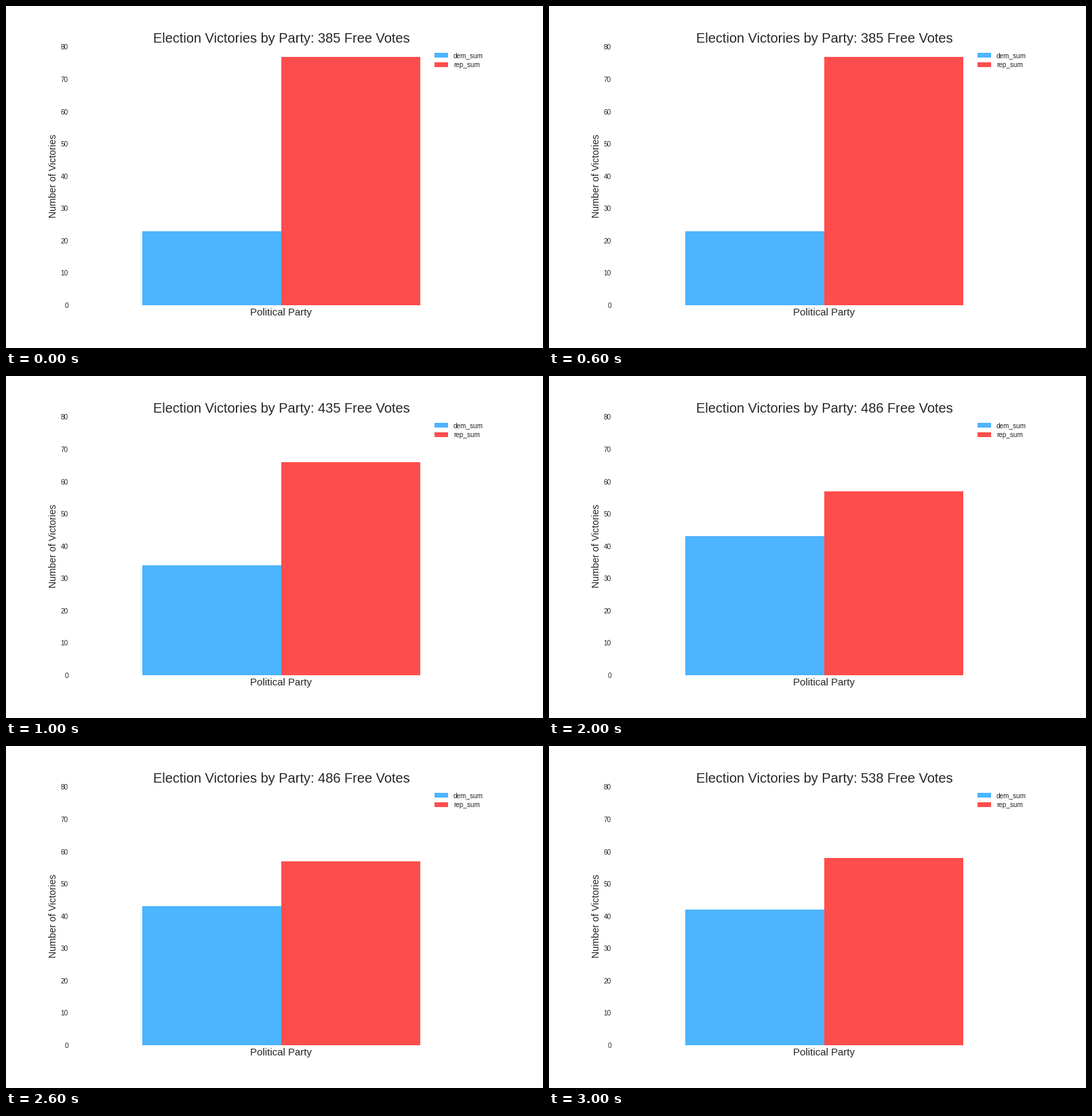
Write a matplotlib script that moves like this. It is 792x504 px and loops after 4000 ms.

```python
import matplotlib.pyplot as plt
from matplotlib.animation import FuncAnimation
from matplotlib.patches import Rectangle

WIDTH, HEIGHT, DPI = 792, 504, 72
BLUE, RED, INK = "#4db4ff", "#ff4d4d", "#262626"
# free votes, Democratic wins, Republican wins
RESULTS = [(385, 23, 77), (435, 34, 66), (486, 43, 57), (538, 42, 58)]

plt.rcParams.update({"font.family": "Liberation Sans", "text.color": INK})

fig = plt.figure(figsize=(WIDTH / DPI, HEIGHT / DPI), dpi=DPI, facecolor="white")
ax = fig.add_axes([0.125, 0.125, 0.775, 0.755])
ax.set(xlim=(-1.5, 1.5), ylim=(0, 80), xticks=[], yticks=range(0, 81, 10))
ax.tick_params(length=0, pad=7, labelsize=10, labelcolor=INK)
ax.spines[:].set_visible(False)
ax.set_ylabel("Number of Victories", fontsize=14, color=INK, labelpad=4)


def label(x, y, text, size, ha="left"):
    """Place text by its baseline, in pixels from the top left."""
    return fig.text(x / WIDTH, 1 - y / HEIGHT, text, fontsize=size,
                    ha=ha, va="baseline")


def legend_row(baseline, color, text):
    fig.add_artist(Rectangle((632 / WIDTH, 1 - baseline / HEIGHT),
                             20 / WIDTH, 7 / HEIGHT,
                             transform=fig.transFigure, fc=color, lw=0))
    label(659.9, baseline, text, 10)


title = label(405.9, 54, "", 20, ha="center")
label(405.9, 456, "Political Party", 15, ha="center")
legend_row(76, BLUE, "dem_sum")
legend_row(90, RED, "rep_sum")
bars = ax.bar([-0.5, 0.5], [0, 0], width=1, color=[BLUE, RED], linewidth=0)


def update(frame):
    votes, *wins = RESULTS[frame]
    title.set_text(f"Election Victories by Party: {votes} Free Votes")
    for bar, count in zip(bars, wins):
        bar.set_height(count)
    return [title, *bars]


anim = FuncAnimation(fig, update, frames=len(RESULTS), interval=1000,
                     repeat=True, repeat_delay=0)
plt.show()
```
